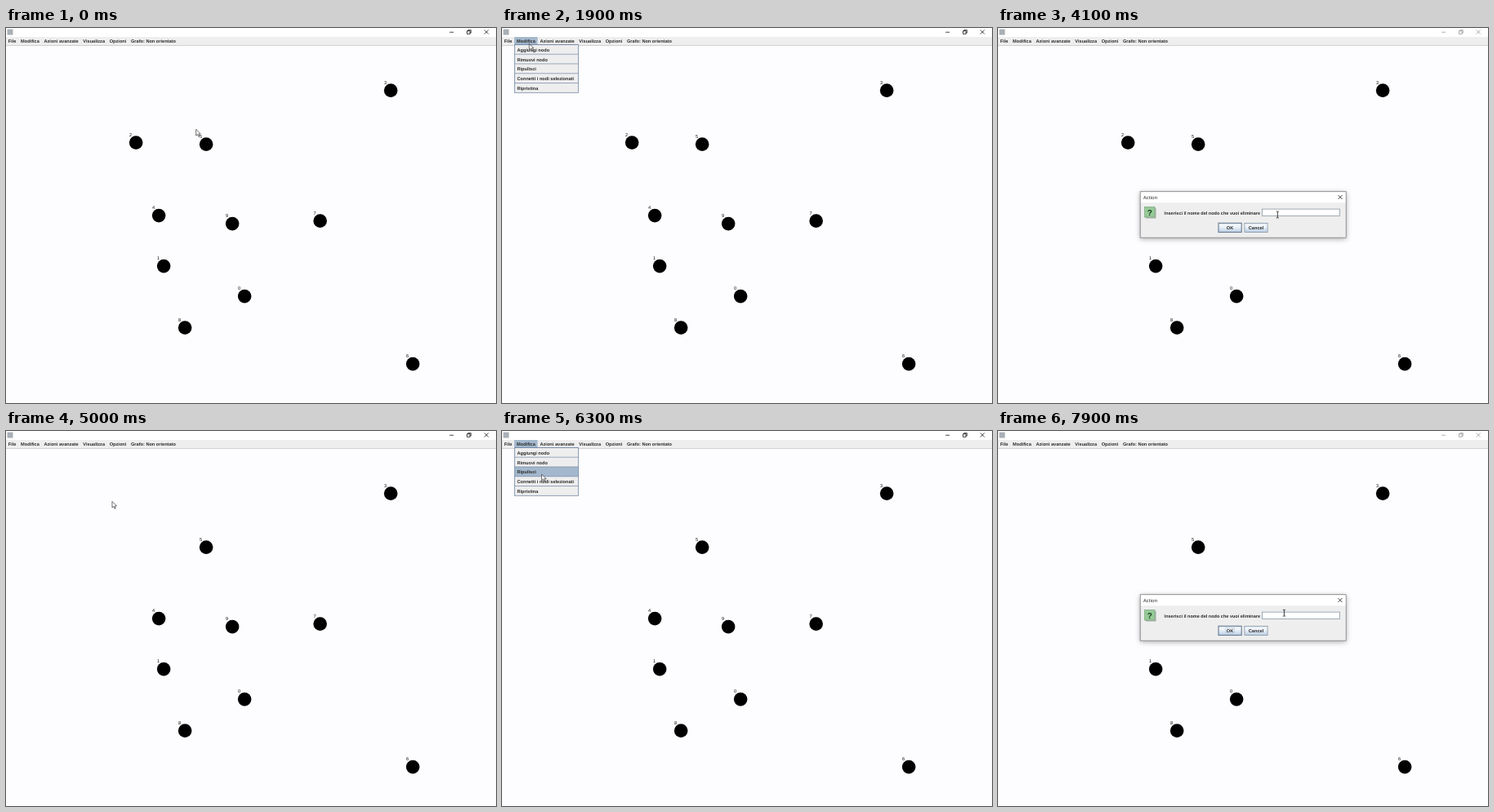
Recreate the animation shown at these times as an HTML page. Size 600 px wide and 460 px high, loop 8000 ms.

```html
<!DOCTYPE html>
<html lang="it">
<head>
<meta charset="utf-8">
<title>Grafo</title>
<style>
  html, body { margin: 0; width: 100%; height: 100%; overflow: hidden; background: #fdfcfe; }
  svg { display: block; width: 600px; height: 460px; }
  text { font: 5.62px "Liberation Sans", Arial, sans-serif; fill: #111; text-rendering: geometricPrecision; }
  .b { font-weight: bold; fill: #2b2b2b; }
  .title { font-family: "Open Sans", sans-serif; font-size: 5.8px; }
  .prompt { font-size: 5.52px; }
  .help { font-size: 10px; fill: #173f1b; }
  .mid { text-anchor: middle; }
  .line { fill: none; stroke: #111; stroke-width: .8; }
</style>
</head>
<body>
<svg viewBox="0 0 600 460">
  <defs>
    <linearGradient id="metal" x2="0" y2="1">
      <stop offset="0" stop-color="#dce7f2"/><stop offset=".3" stop-color="#f4f8fc"/>
      <stop offset="1" stop-color="#b9cee4"/>
    </linearGradient>
    <filter id="shadow" x="-10%" y="-30%" width="120%" height="170%">
      <feDropShadow dx="0" dy="1.5" stdDeviation="3" flood-opacity=".35"/>
    </filter>
  </defs>
  <rect width="600" height="460" fill="#fdfcfe"/>
  <g id="nodes"></g>

  <rect width="600" height="11" fill="#fff"/>
  <rect x="1.5" y="1.5" width="7" height="7" fill="#a9afb6"/>
  <path id="controls" class="line"
    d="M543.2 5.2h4.8M564.5 3.7h3.6v3.6h-3.6zM565.7 3.7v-1.2h3.6v3.6h-1.2M585.8 2.4l5 5m0-5l-5 5"/>
  <rect y="11" width="600" height="10" fill="#eee"/>
  <rect y="21" width="600" height="1" fill="#d2d2d4"/>
  <rect id="menuTab" x="15" y="11" width="28.5" height="9.7" fill="#a3b8cc"/>
  <g id="menuBar"></g>

  <g id="menu">
    <rect x="15.4" y="20.4" width="78" height="58.9" fill="#eee"/>
    <rect id="hover" x="15.4" width="78" height="11.78" fill="#a3b8cc"/>
    <g id="items"></g>
    <rect x="15.4" y="20.4" width="78" height="58.9" fill="none" stroke="#7489a8" stroke-width=".8"/>
  </g>

  <g id="dialog">
    <rect x="174.2" y="200.7" width="252" height="56.5" fill="#eee" filter="url(#shadow)"/>
    <rect x="174.2" y="200.7" width="252" height="13.6" fill="#fff"/>
    <rect x="174.2" y="200.7" width="252" height="56.5" fill="none" stroke="#777" stroke-width=".8"/>
    <text class="title" x="178" y="209.6">Action</text>
    <path class="line" d="M416.5 205l5 5m0-5l-5 5"/>
    <rect x="181" y="221" width="12.6" height="12.6" fill="#b5b5b5"/>
    <rect x="179.6" y="219.6" width="12.4" height="12.4" fill="#95ca97" stroke="#6d9a70" stroke-width=".6"/>
    <text class="b mid help" x="185.8" y="229.5">?</text>
    <text class="b prompt" x="203.6" y="228.7">Inserisci il nome del nodo che vuoi eliminare</text>
    <rect x="323.4" y="222.1" width="95" height="8.4" fill="#fff" stroke="#7a8a99" stroke-width=".7"/>
    <text id="typed" x="324.8" y="228.4">2</text>
    <path id="caret" class="line" d="M325 222.9v6.8"/>
    <rect id="ok" x="270" y="239.3" width="28.2" height="11.2" fill="url(#metal)" stroke="#687b8f" stroke-width="1.1"/>
    <rect id="focus" x="278.8" y="241.5" width="10.4" height="6.6" fill="none" stroke="#a3b8cc" stroke-width=".5"/>
    <text class="b mid" x="284" y="247">OK</text>
    <rect x="301.9" y="239.3" width="28.2" height="11.2" fill="url(#metal)" stroke="#7a8a99" stroke-width=".7"/>
    <text class="b mid" x="316" y="247">Cancel</text>
  </g>

  <path id="arrow" d="M0 0V7.7L1.8 6.1 3.1 9 4.4 8.4 3.1 5.6H5.6Z" fill="#fff" stroke="#222" stroke-width=".65"/>
  <path id="beam" class="line" d="M-1.6-3.9H-.5L0-3.5.5-3.9H1.6M0-3.5V3.5M-1.6 3.9H-.5L0 3.5.5 3.9H1.6"/>
</svg>
<script>
const $ = id => document.getElementById(id);
const NS = "http://www.w3.org/2000/svg";
const LOOP = 8000, STEP = 100;
const MENU_LEFT = 15.4, MENU_TOP = 20.4, ROW = 11.78;

function add(parent, tag, attrs = {}, label = "") {
  const el = document.createElementNS(NS, tag);
  for (const key in attrs) el.setAttribute(key, attrs[key]);
  el.textContent = label;
  return parent.appendChild(el);
}

// Node centres, indexed by label
const nodes = [
  [292, 329], [193, 292], [159, 140.5], [471, 76.5], [187, 230],
  [245, 142.5], [498, 412], [384.5, 236.5], [219, 367.5], [277, 240]
].map(([x, y], label) => {
  const node = add($("nodes"), "g", { transform: `translate(${x + .15} ${y + .1})` });
  add(node, "circle", { r: 8.3 });
  add(node, "text", { x: -8.2, y: -7.9 }, label);
  return node;
});

// Menu titles flow left to right with an even gap
let titleX = 2.7;
for (const label of ["File", "Modifica", "Azioni avanzate", "Visualizza", "Opzioni", "Grafo: Non orientato"]) {
  const title = add($("menuBar"), "text", { class: "b", x: titleX, y: 17.8 }, label);
  titleX += title.getComputedTextLength() + 5.7;
}

["Aggiungi nodo", "Rimuovi nodo", "Ripulisci", "Connetti i nodi selezionati", "Ripristina"]
  .forEach((label, i) => {
    const y = MENU_TOP + i * ROW;
    add($("items"), "text", { class: "b", x: 18.5, y: y + 8.4 }, label);
    add($("items"), "path", { d: `M${MENU_LEFT} ${y}h78`, stroke: "#7489a8", "stroke-width": .7 });
  });

// Each pointer move: start, end, destination
const home = [232.7, 124.3];
const moves = [
  [0, 1000, 307, 372],      // down across the graph
  [1000, 1600, 33.3, 19.2], // to the menu title
  [1900, 2600, 46, 41],     // to the remove item
  [2800, 3600, 342.3, 229], // into the field
  [4400, 4800, 286, 244],   // to OK
  [4800, 5400, 64.3, 20],   // back to the menu bar
  [5400, 5800, 32, 17],
  [5800, 6500, 49, 54],
  [6500, 7100, 45.7, 41.7],
  [7100, 7900, 350.4, 223.2]
];
const easeOut = k => 1 - (1 - k) ** 3;

function pointerAt(t) {
  let [x, y] = home;
  for (const [start, end, toX, toY] of moves) {
    if (t <= start) break;
    const k = easeOut(Math.min(1, (t - start) / (end - start)));
    x += (toX - x) * k;
    y += (toY - y) * k;
  }
  return [x, y];
}

const within = (t, a, b) => t >= a && t < b;
const show = (el, on) => { el.style.display = on ? "" : "none"; };

// Visible share of the dialog: fades in after the menu closes, out after OK
function dialogAt(t) {
  if (within(t, 4800, 7100)) return Math.max(0, 1 - (t - 4800) / 170);
  const age = t - (t < 4800 ? 2800 : 7100);
  return easeOut(Math.min(1, Math.max(0, (age - 50) / 360)));
}

function draw(t) {
  const [x, y] = pointerAt(t);
  const shown = dialogAt(t);
  const menuOpen = within(t, 1800, 2800) || within(t, 5800, 7100);
  const modal = within(t, 2800, 4900) || t >= 7100;
  const row = Math.floor((y - MENU_TOP) / ROW);
  const overField = shown > .9 && x > 323 && x < 418 && y > 221.5 && y < 231;

  show(nodes[2], t < 4900);
  $("controls").style.stroke = modal ? "#999" : "#111";
  show($("menuTab"), menuOpen);
  show($("menu"), menuOpen);
  show($("hover"), row >= 0 && row < 5);
  $("hover").setAttribute("y", MENU_TOP + row * ROW);

  show($("dialog"), shown > 0);
  $("dialog").setAttribute("opacity", shown);
  $("dialog").setAttribute("transform",
    `translate(300.2 229) scale(${.96 + .04 * shown}) translate(-300.2 -229)`);
  show($("typed"), within(t, 4400, 5000));
  show($("caret"), within(t, 3600, 4100));
  show($("focus"), !within(t, 3600, 4800));
  $("ok").setAttribute("fill", t === 4800 ? "#a3b8cc" : "url(#metal)");

  for (const id of ["arrow", "beam"]) {
    show($(id), (id === "beam") === overField);
    $(id).setAttribute("transform", `translate(${x} ${y})`);
  }
}

function tick() {
  const t = performance.now() % LOOP;
  draw(Math.floor(t / STEP) * STEP);
  requestAnimationFrame(tick);
}
tick();
</script>
</body>
</html>
```
